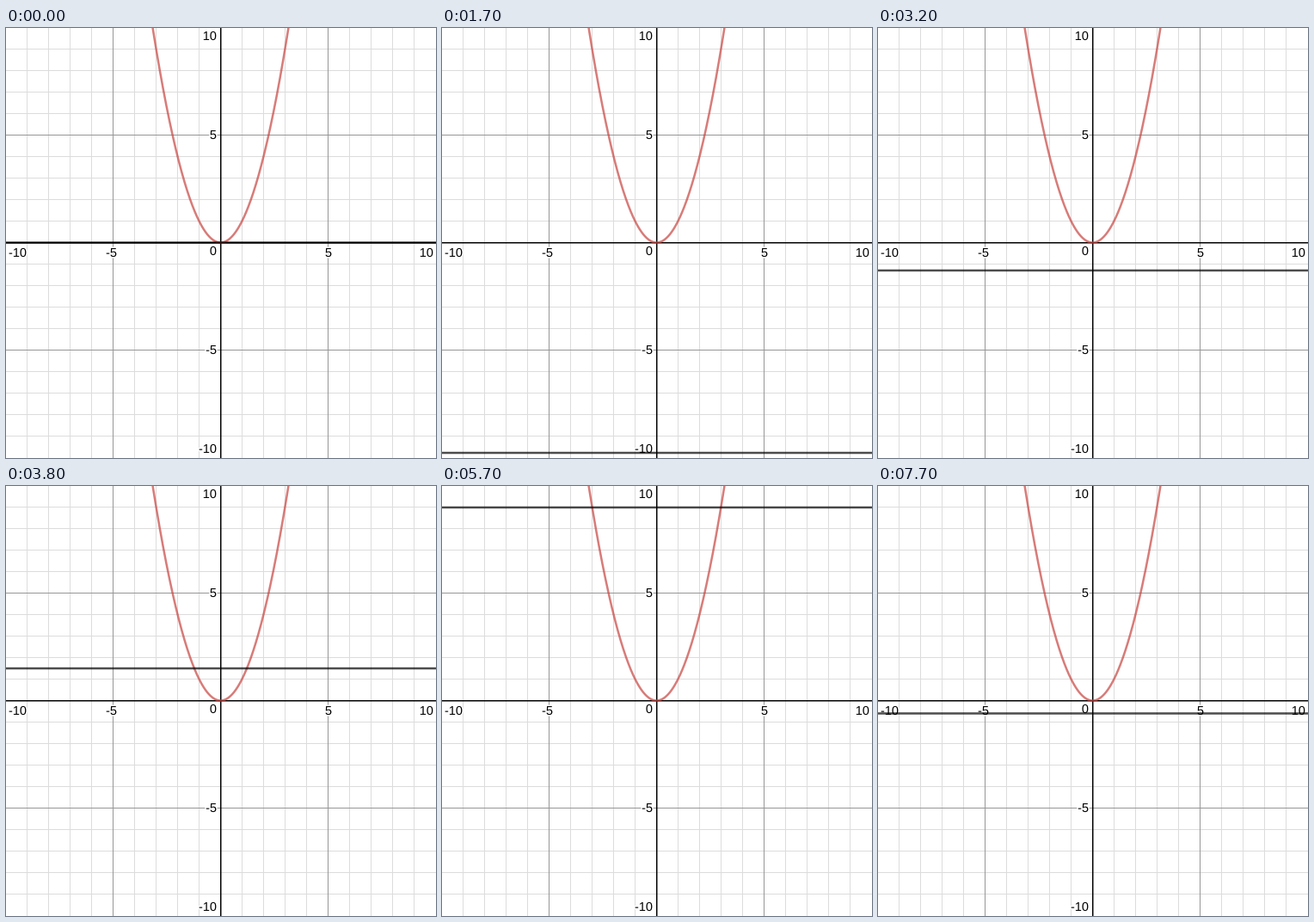
Animation of 500 by 500 pixels, one loop 7900 ms. Source, as a matplotlib script:

```python
import numpy as np
import matplotlib.pyplot as plt
from matplotlib import patheffects
from matplotlib.animation import FuncAnimation

SIZE, DPI = 500, 100
MID = (SIZE - 1) / 2
UNIT = MID / 10
FRAMES, STEP_MS = 79, 100


def pt(px):
    return px * 72 / DPI


fig = plt.figure(figsize=(SIZE / DPI, SIZE / DPI), dpi=DPI, facecolor="white")
ax = fig.add_axes([0, 0, 1, 1])
ax.set_xlim(0, SIZE)
ax.set_ylim(SIZE, 0)
ax.axis("off")


def stroke(x, y, color, width, z, alpha=1):
    line, = ax.plot(x, y, color=color, lw=pt(width), alpha=alpha, zorder=z,
                    snap=False, solid_capstyle="butt", solid_joinstyle="round")
    return line


def cross(pos, color, width, z):
    """One horizontal and one vertical line at the same offset."""
    stroke([0, SIZE], [pos, pos], color, width, z)
    stroke([pos, pos], [0, SIZE], color, width, z)


def label(x, y, text, align):
    ax.text(x, y, text, ha=align, va="baseline", color="black", zorder=4,
            family="Liberation Sans", size=pt(14.5),
            path_effects=[patheffects.withStroke(linewidth=pt(3),
                                                 foreground="white")])


# Grid and axes, with grid lines on whole pixels
for k in range(-9, 10):
    pos = np.floor(MID + k * UNIT) + 0.5
    if k % 5:
        cross(pos, "#dcdcdc", 1, 1)
    elif k:
        cross(pos, "#969696", 1, 2)
cross(MID + 0.25, "black", 1.5, 5)

# Axis numbers
label(3, 266, "-10", "left")
label(122.5, 266, "-5", "center")
label(375, 266, "5", "center")
label(497, 266, "10", "right")
for value, base in (("10", 14), ("5", 129), ("0", 264), ("-5", 379), ("-10", 494)):
    label(245, base, value, "right")

# Parabola y = x^2
xs = np.linspace(-3.4, 3.4, 400)
stroke(MID + UNIT * xs, MID - UNIT * xs ** 2, "#c74440", 2.5, 6, alpha=0.7)

level = stroke([0, SIZE], [MID, MID], "black", 2.5, 7, alpha=0.7)

# Distance travelled by the level line, bouncing between -10 and 10
KEYS = [0, 8, 17, 26, 38, 57, 68, 77]
TRAVEL = [0, 4.7, 10.2, 15.9, 21.5, 31, 37.2, 40.6]


def height(i):
    u = np.interp(i, KEYS, TRAVEL)
    return abs((u + 10) % 40 - 20) - 10


def update(i):
    y = MID - UNIT * height(i)
    level.set_ydata([y, y])
    return level,


anim = FuncAnimation(fig, update, frames=FRAMES, interval=STEP_MS,
                     repeat=True, repeat_delay=0, blit=False)
plt.show()
```
